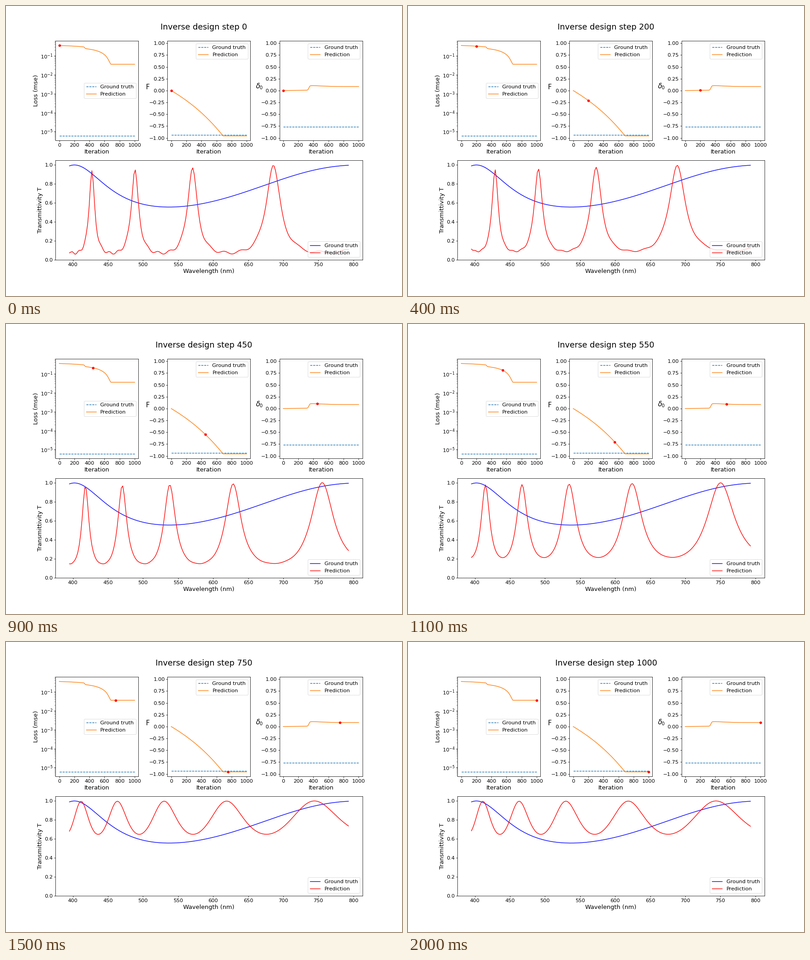
Write a matplotlib script that moves like this. It is 874 px wide and 641 px high and loops after 2100 ms.

```python
import numpy as np
import matplotlib.pyplot as plt
from matplotlib.animation import FuncAnimation

plt.rcParams.update({
    "font.family": "DejaVu Sans", "font.size": 14, "axes.labelsize": 16,
    "figure.subplot.bottom": 0.125, "figure.subplot.top": 0.88,
    "figure.subplot.left": 0.125, "figure.subplot.right": 0.9,
    "lines.linewidth": 1.7, "lines.dashed_pattern": (3.3, 1.4),
    "axes.linewidth": 1.0, "xtick.major.width": 1.0, "ytick.major.width": 1.0,
})

FRAMES, STRIDE = 21, 50
F_TRUE, D_TRUE, LOSS_TRUE = -0.935, -0.7645, 5.9e-6
steps = np.arange(1001)
wave = np.arange(395, 794, 2.0)


def order(d):
    """Interference order along the spectrum, with slight dispersion."""
    return 3423 * (1 + d) * (1 + 1.4e-5 * (wave - 580)) / wave


def airy(f, d):
    return 1 / (1 + 12.3 * (1 + f) * np.sin(np.pi * order(d)) ** 2)


def predict(f, d):
    """Airy spectrum with the network's damped peaks and ringing."""
    gain = 1 - 0.06 * (1 + f) * (720 - wave) / 270
    ringing = 0.014 * (1 + f) ** 3 * np.cos(10 * np.pi * (order(d) - 0.56))
    return gain * airy(f, d) + ringing


# F falls along a cubic until it settles; delta hops to the next plateau.
x = steps / 1000
finesse = np.maximum(-(0.954 * x + 0.414 * x**2 + 0.327 * x**3), -0.956)
hop = 1 / (1 + np.exp(-(steps - 340) / 6.5))
plateau = 0.084 + 0.02 * np.exp(-(np.maximum(steps - 360, 0) / 220) ** 2)
delta = (1 - hop) * 2e-5 * steps + hop * plateau

truth = airy(F_TRUE, D_TRUE)
spectra = predict(finesse[:, None], delta[:, None])
loss = ((spectra - truth) ** 2).mean(axis=1)

fig = plt.figure(figsize=(15.0043, 11.0043), dpi=58.25)
grid = fig.add_gridspec(2, 3, wspace=0.35, hspace=0.2)
title = fig.suptitle("", fontsize=22, y=0.94)


def history(col, target, values, loc):
    ax = fig.add_subplot(grid[0, col])
    ax.plot(steps, np.full(len(steps), target), "--", label="Ground truth")
    ax.plot(steps, values, label="Prediction")
    dot, = ax.plot([], [], "ro")
    ax.set_xlim(-50, 1050)
    ax.set_xticks(range(0, 1001, 200))
    ax.set_xlabel("Iteration")
    ax.legend(loc=loc)
    return ax, dot, values


panels = [history(0, LOSS_TRUE, loss, "center right"),
          history(1, F_TRUE, finesse, "upper right"),
          history(2, D_TRUE, delta, "upper right")]
panels[0][0].set_yscale("log")
panels[0][0].set_ylim(10**-5.469, 10**-0.196)
panels[0][0].set_ylabel("Loss (mse)")
for (ax, _, _), name in zip(panels[1:], ["F", r"$\delta_0$"]):
    ax.set_ylim(-1.05, 1.05)
    ax.set_yticks(np.arange(-1, 1.1, 0.25))
    ax.set_ylabel(name, rotation=0, fontsize=18)

spec = fig.add_subplot(grid[1, :])
spec.plot(wave, truth, "b", label="Ground truth")
curve, = spec.plot(wave, spectra[0], "r", label="Prediction")
spec.set_ylim(0, 1.05)
spec.set_xlabel("Wavelength (nm)")
spec.set_ylabel("Transmittivity T")
spec.legend(loc="lower right")


def update(i):
    s = i * STRIDE
    title.set_text(f"Inverse design step {s}")
    for _, dot, values in panels:
        dot.set_data([s], [values[s]])
    curve.set_ydata(spectra[s])
    return [title, curve] + [dot for _, dot, _ in panels]


anim = FuncAnimation(fig, update, frames=FRAMES, interval=100, repeat=True,
                     repeat_delay=0, init_func=lambda: update(0))
plt.show()
```
